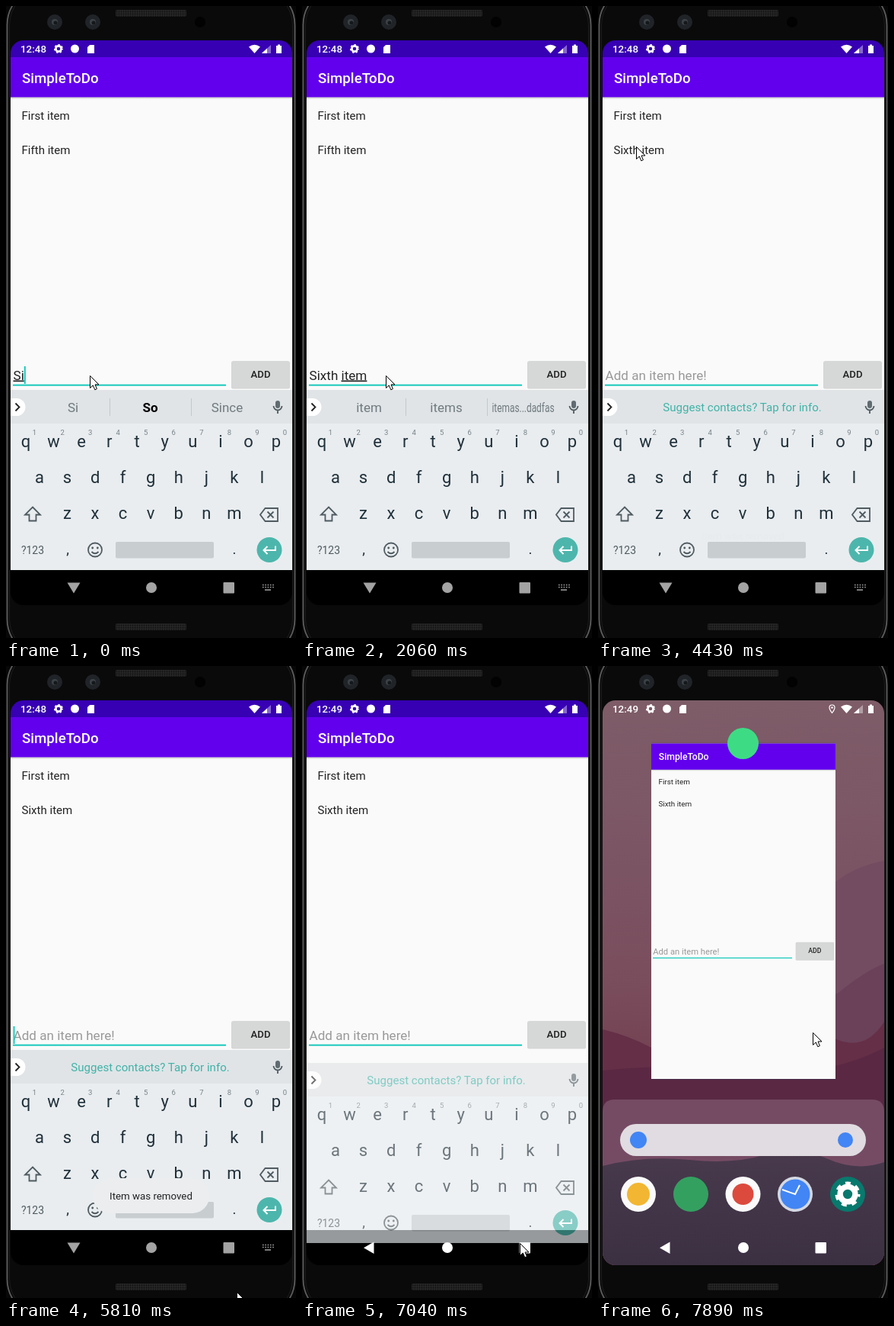
An HTML page for the animation above (8 s loop, 381 by 828 pixels).

```html
<!DOCTYPE html>
<html lang="en">
<head>
<meta charset="utf-8">
<title>To-do list</title>
<style>
  html, body { margin: 0; width: 100%; height: 100%; overflow: hidden; background: #070707; }
  svg { display: block; width: 381px; height: 828px; }
  text { font-family: Roboto, "Noto Sans", sans-serif; white-space: pre; }
  .mid { text-anchor: middle; }
  .medium { font-weight: 500; }
  .line { fill: none; stroke: #4f5b61; stroke-width: 1.8; }
  .item { font-size: 15.06px; fill: #222; }
  .edit { font-size: 17.1px; }
  .word { font-size: 17px; fill: #6f7a7f; }
  .word.bold { font-weight: 700; fill: #000; }
</style>
</head>
<body>
<svg viewBox="0 0 381 828">
  <defs>
    <clipPath id="screen"><rect x="6" y="45" width="370" height="740" rx="17"/></clipPath>
    <pattern id="mesh" width="3" height="3" patternUnits="userSpaceOnUse">
      <rect width="3" height="3" fill="#262626"/><circle cx="1.5" cy="1.5" r=".9" fill="#101010"/>
    </pattern>
    <linearGradient id="sky" x1="0" y1="0" x2="0" y2="1">
      <stop offset="0" stop-color="#7e5c68"/><stop offset=".3" stop-color="#7b5464"/>
      <stop offset=".5" stop-color="#7a4d5c"/><stop offset=".62" stop-color="#744354"/>
      <stop offset="1" stop-color="#5b3149"/>
    </linearGradient>
    <linearGradient id="hill" x1="0" y1="0" x2="0" y2="1">
      <stop offset="0" stop-color="#493a4d"/><stop offset="1" stop-color="#3b3042"/>
    </linearGradient>
    <linearGradient id="shade" x1="0" y1="0" x2="0" y2="1">
      <stop offset="0" stop-opacity=".2"/><stop offset="1" stop-opacity="0"/>
    </linearGradient>
  </defs>

  <rect width="381" height="828" fill="#070707"/>
  <rect x="1.500" y="-25" width="378" height="878" rx="50" fill="#0a0a0a" stroke="#5c5c5c" stroke-width="1.800"/>
  <rect x="4.500" y="-22" width="372" height="872" rx="47" fill="none" stroke="#1d1d1d"/>
  <rect x="144" y="5" width="93" height="9" rx="2" fill="url(#mesh)"/>
  <rect x="144" y="809" width="93" height="9" rx="2" fill="url(#mesh)"/>
  <g fill="#202428">
    <circle cx="64" cy="21" r="10"/><circle cx="114" cy="21" r="10"/>
    <circle cx="255" cy="21" r="7" fill="#020202"/>
    <g fill="#3b4247"><circle cx="64" cy="21" r="4"/><circle cx="114" cy="21" r="4"/></g>
    <g fill="#15181b"><circle cx="65" cy="22" r="2.5"/><circle cx="115" cy="22" r="2.5"/></g>
  </g>

  <g clip-path="url(#screen)">
    <g id="home">
      <rect x="6" y="45" width="370" height="740" fill="url(#sky)"/>
      <path d="M376 255 Q340 262 316 280 L240 330 V470 H376z" fill="#734c61"/>
      <path d="M376 390 Q350 400 316 428 L200 480 V520 H376z" fill="#6a4159"/>
      <path d="M6 476 Q40 484 70 500 T190 496 T316 490 T376 466 V785 H6z" fill="#652f47"/>
      <path d="M6 530 Q100 520 200 530 T376 500 V785 H6z" fill="#5a2843"/>
      <path d="M6 785 V584 Q6 568 22 568 H360 Q376 568 376 584 V785z" fill="#a08398" opacity=".38"/>
      <path d="M6 655 Q60 641 120 647 T220 640 T300 645 T376 650 V785 H6z" fill="url(#hill)"/>
      <rect x="29" y="600" width="323" height="42" rx="21" fill="#e1dce1"/>
      <g id="dock"></g>
    </g>

    <g id="app">
      <rect x="6" y="66" width="370" height="674" fill="#3b2a4a"/>
      <rect x="6" y="67" width="370" height="672" fill="#fafafa"/>
      <rect x="6" y="67" width="370" height="52.500" fill="#6200ee"/>
      <rect x="6" y="119.500" width="370" height="3" fill="url(#shade)"/>
      <text class="medium" x="21" y="100.500" font-size="18.7" fill="#fff">SimpleToDo</text>
      <g id="list"></g>
      <text class="edit" id="hint" x="9.500" y="489.500" fill="#999">Add an item here!</text>
      <text class="edit" x="9.500" y="489.500" fill="#222" id="field"><tspan id="done"></tspan><tspan id="comp" text-decoration="underline"></tspan></text>
      <rect x="9" y="495.700" width="280" height="2" fill="#1bcabd"/>
      <rect id="caret" y="472" width="2" height="23" fill="#1bcabd"/>
      <rect x="296" y="465.500" width="77" height="36" rx="2" opacity=".15"/>
      <rect id="add" x="297" y="465" width="75" height="35" rx="2"/>
      <text class="mid medium" x="334.500" y="487" font-size="13.2" fill="#222">ADD</text>
    </g>

    <rect id="bar" x="6" y="45" width="370" height="22" fill="#3700b3"/>
    <g id="status" fill="#fff">
      <text class="medium" id="clock" x="19" y="61" font-size="13.4"></text>
      <circle cx="90.500" cy="56" r="5.500"/>
      <path d="M110 51 H116 V62 H107 V54z"/>
      <path d="M319 53.500 Q326.500 48 334 53.500 L326.500 62z"/>
      <path d="M348 51 V62 H336z" opacity=".4"/><path d="M343 55.500 V62 H336z"/>
      <path d="M357 50.500 h3 v1.500 h2 v10 h-7 v-10 h2z"/>
      <g id="pin">
        <path d="M307.500 61.500 Q304 57 304 54.500 a3.500 3.500 0 0 1 7 0 Q311 57 307.500 61.500z" fill="none" stroke="#fff" stroke-width="1.200"/>
        <circle cx="307.500" cy="54.500" r="1.300"/>
      </g>
    </g>

    <rect id="navBack" x="6" y="739" width="370" height="46"/>
    <g id="nav">
      <path id="back"/>
      <circle cx="191" cy="762" r="7"/><rect x="285.500" y="755" width="14.500" height="14.500" rx="1"/>
      <g id="switcher" fill="none" stroke="#a3a3a3" stroke-width="1.600">
        <path d="M337 758.500 H352 M337 761.500 H352" stroke-dasharray="1.600 1.700"/><path d="M340 765 H348"/>
      </g>
    </g>

    <g id="kb">
      <rect x="6" y="503" width="370" height="236" fill="#e9edf0"/>
      <rect x="6" y="503" width="370" height="44" fill="#e0e4e7"/>
      <path d="M6 514 H14 a11.500 11.500 0 0 1 0 23 H6z" fill="#fff"/>
      <path class="line" d="M12.500 520.500 l5 5 -5 5" style="stroke:#222"/>
      <path id="dividers" d="M136.500 514 V537 M243.500 514 V537" stroke="#c3c8cb"/>
      <g id="words"></g>
      <text class="mid" id="tip" x="189.500" y="531" font-size="15.06" fill="#3fb3a7">Suggest contacts? Tap for info.</text>
      <rect x="354" y="517" width="6" height="10" rx="3" fill="#5f6b70"/>
      <path class="line" d="M351.500 524 a5.500 5.500 0 0 0 11 0 M357 529.500 V534"/>
      <g id="keys"></g>
      <path class="line" d="M35 656.500 l10 10 h-5.500 v8 h-9 v-8 h-5.500z"/>
      <path class="line" d="M340.500 658 H357 V675 H340.500 L334 666.500z M343.500 662.500 l8 8 m0 -8 l-8 8"/>
      <circle class="line" cx="117" cy="712.500" r="9"/>
      <path class="line" d="M112.500 715 q4.500 4.500 9 0"/>
      <circle cx="113.700" cy="710" r="1.400" fill="#4f5b61"/><circle cx="120.300" cy="710" r="1.400" fill="#4f5b61"/>
      <rect x="144" y="702" width="129" height="21.500" rx="2" fill="#c8cdd0"/>
      <circle cx="346" cy="712.500" r="16.500" fill="#4db6ac"/>
      <path class="line" d="M354 707.500 v5.500 h-15.500 m5 -5 l-5 5 5 5" style="stroke:#fff;stroke-width:2"/>
    </g>

    <circle id="badge" r="20.500" fill="#3ddc84"/>
    <g id="toast">
      <rect id="pill" y="671" height="46" rx="23" fill="#ebedef"/>
      <text class="mid" id="note" x="190.500" y="699" font-size="13.3" fill="#222"></text>
    </g>
  </g>
  <path id="mouse" d="M.5 .5 V16.500 L4.300 13 L6.800 18.800 L9.400 17.600 L7 12 H12z" fill="#fff" stroke="#000"/>
</svg>

<script>
const $ = id => document.getElementById(id);
const set = (id, attrs) => { for (const k in attrs) $(id).setAttribute(k, attrs[k]); };
const show = (id, on) => set(id, { visibility: on ? "visible" : "hidden" });
const disc = (x, y, r, fill) => `<circle cx="${x}" cy="${y}" r="${r}" fill="${fill}"/>`;
const gear = (x, y, r) => `<g fill="none" stroke="#fff" transform="translate(${x} ${y}) scale(${r})">
  <circle r=".6" stroke-width=".45"/><circle r=".87" stroke-width=".26" pathLength="12" stroke-dasharray="1" stroke-dashoffset=".5"/></g>`;

// Keyboard
let keys = "";
const label = (x, y, s, size, fill = "#20303a") =>
  keys += `<text class="mid" x="${x}" y="${y}" font-size="${size}" fill="${fill}">${s}</text>`;
[["qwertyuiop", 26, 578], ["asdfghjkl", 44, 625], ["zxcvbnm", 80.5, 672]].forEach(([row, x, y], r) =>
  [...row].forEach((c, i) => {
    label(x + i * 36.55, y, c, 22);
    if (!r) label(x + 11.5 + i * 36.55, 562, (i + 1) % 10, 9.5, "#778287");
  }));
label(35, 717.5, "?123", 14, "#4f5b61");
label(81, 718, ",", 19);
label(300, 718, ".", 19);
$("keys").innerHTML = keys;

// Home screen
$("dock").innerHTML =
  disc(53, 621, 11, "#4285f4") + disc(325, 621, 10, "#4285f4") +
  disc(53, 692, 23, "#fafafa") + disc(53, 692, 15, "#f2b632") +
  disc(122, 692, 23, "#34a060") +
  disc(190.5, 692, 23, "#fafafa") + disc(190.5, 692, 14, "#dc4a3e") +
  disc(259, 692, 23, "#d5d9e2") + disc(259, 692, 19.5, "#4285f4") +
  `<path d="M242 686 L259 692 L265 680" fill="none" stroke="#fff" stroke-width="2"/>` +
  disc(328, 692, 23, "#08796d") + gear(328, 692, 16.5);
$("status").insertAdjacentHTML("beforeend", gear(69, 56, 6));

// Moments at which the picture is refreshed: start, end, count
const steps = [[0], [280], [560], [930], [1250, 1540, 3], [2060, 3100, 9], [3250], [3490, 3760, 3],
  [4190, 4700, 5], [5110], [5530, 6490, 8], [6770, 7040, 3], [7190], [7320, 7740, 4], [7890]]
  .flatMap(([a, b, n = 1]) => Array.from({ length: n }, (_, i) => n > 1 ? a + (b - a) * i / (n - 1) : a));

// Typing: time, finished text, word in progress, suggestions
const typing = [
  [0, "", "Si", "Si", "*So", "Since"],
  [280, "", "Six", "Six", "Sis", "Size"],
  [560, "", "Sixt", "Sixt", "*Sixth", "Sixty"],
  [930, "", "Sixth", "Sixth", "Sixths", "Sixty"],
  [1250, "Sixth ", "", "grade", "floor", "item"],
  [1390, "Sixth ", "it", "it", "item", "its"],
  [1540, "Sixth ", "item", "item", "items", "itemas...dadfas"],
  [2710, "", ""]
];
const blinks = [2060, 2580, 3250, 3760, 4190, 4700, 5110, 5530, 6070, 6490, 6770];
const pointer = [[2060, 110, 484], [2450, 318, 484], [2710, 318, 484], [3100, 110, 250], [3250, 50, 164],
  [3760, 50, 184], [5400, 50, 184], [5800, 303, 820], [6070, 300, 815], [6490, 286, 756],
  [7320, 286, 756], [7740, 282, 490], [7890, 282, 480]];
const appPose = [[7040, 6, 67, 1], [7190, 66.6, 99.3, .671], [7460, 70, 101.5, .654]];
const kbPose = [[6905, 0, 1], [7040, 17, .65], [7190, 60, 0]];
const toastFade = [[2710, 0], [3250, 1], [4190, 1], [4317, 0], [4572, 1], [6215, 1], [6490, 0]];
const badgeSize = [[7190, 0], [7460, 1]];

function track(list, t) {
  const i = list.findIndex(k => k[0] > t);
  if (i < 0) return list[list.length - 1].slice(1);
  if (!i) return list[0].slice(1);
  const [a, b] = [list[i - 1], list[i]], f = (t - a[0]) / (b[0] - a[0]);
  return a.slice(1).map((v, j) => v + (b[j + 1] - v) * f);
}

function drawWords(words) {
  $("words").innerHTML = words.map((w, i) => {
    const bold = w[0] === "*", long = w.length > 10;
    return `<text class="word mid ${bold ? "bold" : ""}" transform="translate(${[88, 189.5, 290.5][i]} 532)
      scale(${long ? .7 : 1} 1)">${bold ? w.slice(1) : w}</text>`;
  }).join("");
}

function draw(t) {
  const [, done, comp, ...words] = typing.filter(k => k[0] <= t).pop();
  const empty = !done && !comp, home = t >= 7190, hiding = t >= 7040;

  $("done").textContent = done;
  $("comp").textContent = comp;
  show("hint", empty);
  show("tip", empty);
  show("dividers", !empty);
  drawWords(words);
  set("caret", { x: empty ? 9.5 : 9.5 + $("field").getComputedTextLength() });
  show("caret", blinks.filter(b => b <= t).length % 2 === 0);
  set("add", { fill: t >= 2580 && t < 2840 ? "#c6c7c7" : "#d6d7d7" });

  const items = ["First", ...(t < 4310 ? ["Fifth"] : []), ...(t >= 2710 ? ["Sixth"] : [])];
  $("list").innerHTML = items.map((s, i) => `<text class="item" x="20.500" y="${148.5 + i * 45.2}">${s} item</text>`).join("");

  const [ax, ay, s] = track(appPose, t);
  set("app", { transform: `translate(${ax} ${ay}) scale(${s}) translate(-6 -67)` });
  show("home", home);
  show("bar", !home);
  show("navBack", !home);
  show("pin", t >= 7460);
  $("clock").textContent = t < 6200 ? "12:48" : "12:49";

  const [ky, ko] = track(kbPose, t);
  set("kb", { transform: `translate(0 ${ky})`, opacity: ko });
  set("nav", { fill: hiding ? "#fff" : "#a3a3a3" });
  set("back", { d: hiding ? "M94.500 754.500 V770 L81 762.300z" : "M80.500 755.500 H97.500 L89 769.500z" });
  show("switcher", !hiding);

  $("note").textContent = t < 4310 ? "Item was added" : "Item was removed";
  const w = $("note").getComputedTextLength() + 45;
  set("pill", { x: 190.5 - w / 2, width: w });
  set("toast", { opacity: track(toastFade, t)[0] });

  set("badge", { transform: `translate(190.500 101.500) scale(${track(badgeSize, t)[0]})` });
  set("mouse", { transform: `translate(${track(pointer, t)})` });
}

let last = -1;
const start = performance.now();
function tick() {
  const now = (performance.now() - start) % 8000;
  const t = steps.filter(s => s <= now).pop() ?? 0;
  if (t !== last) draw(last = t);
  requestAnimationFrame(tick);
}
tick();
</script>
</body>
</html>
```
